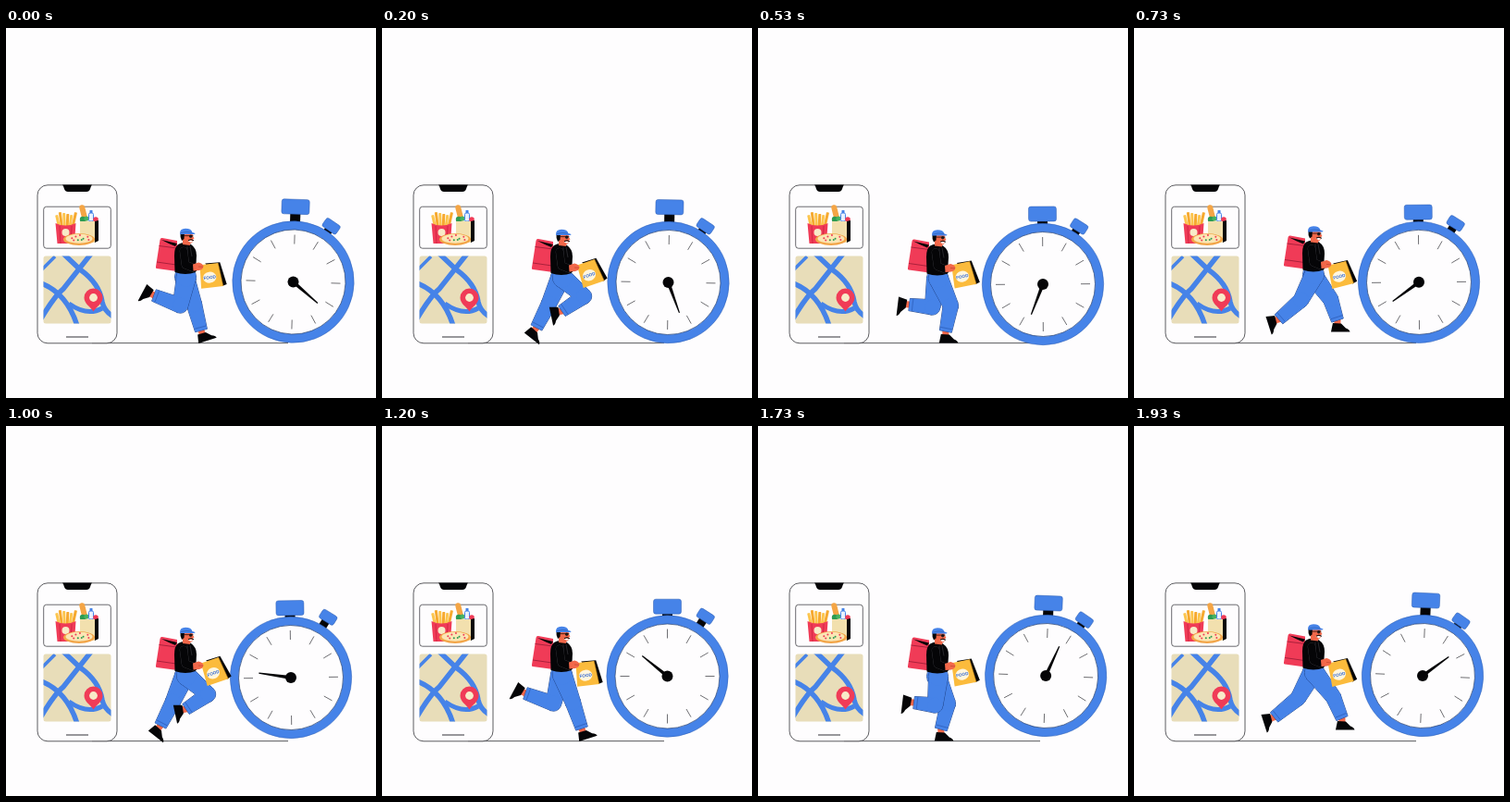
An HTML page with a canvas that plays this animation: 400x400 px, repeating every 2 s.

```html
<!DOCTYPE html>
<html lang="en">
<head>
<meta charset="utf-8">
<title>Food delivery</title>
<style>
html, body { margin: 0; width: 100%; height: 100%; overflow: hidden; background: #fefdfe; }
canvas { display: block; width: 400px; height: 400px; }
</style>
</head>
<body>
<canvas id="stage"></canvas>
<script>
const canvas = document.getElementById('stage');
const ctx = canvas.getContext('2d');
const dpr = window.devicePixelRatio || 1;
canvas.width = canvas.height = 400 * dpr;

const LOOP = 2000, FRAME = LOOP / 30, STEP = 400, STRIDE = 800;
const BLUE = '#4683e8', RED = '#f03b57', INK = '#050507', SKIN = '#f2684a',
      BEIGE = '#e8ddb9', CREAM = '#f8ebc8', YELLOW = '#fbbb3c', PAPER = '#fefdfe';
const rad = deg => deg * Math.PI / 180;

// time, x, y, tilt, hand angle, crown distance, side button distance
const WATCH = [
  [0, 310.5, 274.5, 1.8, 131, 81.3, 73],
  [200, 309.5, 275, 1, 160, 81.3, 72.8],
  [533, 308, 277, -0.4, 201, 76, 73.8],
  [1000, 308, 272, -0.8, 278, 75.3, 76.7],
  [1200, 308.5, 270.5, 0, 309, 75.3, 76.8],
  [1533, 310.3, 270, 1.8, 355, 75.5, 74.5],
  [1933, 312, 270, 2.5, 414, 81.5, 72.3]
];
// time, knee x, knee y, ankle x, ankle y, foot angle
const LEG = [
  [0, 205, 299, 213.5, 327, -18],
  [133, 207, 300, 200.5, 328, 0],
  [200, 182, 298, 169.5, 324, 38],
  [333, 179, 294, 154, 315, 72],
  [400, 187, 300, 157.5, 289, 118],
  [533, 190, 302, 166, 299, 97],
  [600, 217, 290, 192, 306, 78],
  [667, 220, 290, 211, 314, 15],
  [733, 214, 293, 222.5, 316, 0],
  [800, 205, 299, 213.5, 327, -18]
];
// time, body offset, bag x, bag y, bag angle
const BODY = [
  [0, 0, 221, 268, -7],
  [133, 1.5, 221.5, 267, -11],
  [200, 1, 224.5, 265.5, -19],
  [333, -2.5, 222.5, 267, -14],
  [400, 0, 221, 268, -7]
];

function at(keys, t) {
  let i = 1;
  while (i < keys.length - 1 && keys[i][0] < t) i++;
  const a = keys[i - 1], b = keys[i];
  const k = Math.min(1, (t - a[0]) / (b[0] - a[0]));
  return a.slice(1).map((v, n) => v + (b[n + 1] - v) * k);
}

function paint(fill, stroke, width = 0.8) {
  if (fill) { ctx.fillStyle = fill; ctx.fill(); }
  if (stroke) { ctx.strokeStyle = stroke; ctx.lineWidth = width; ctx.stroke(); }
}
function shape(d, fill, stroke, width = 0.8) {
  const p = new Path2D(d);
  if (fill) { ctx.fillStyle = fill; ctx.fill(p); }
  if (stroke) { ctx.strokeStyle = stroke; ctx.lineWidth = width; ctx.stroke(p); }
}
function box(x, y, w, h, r, fill, stroke, width) {
  ctx.beginPath();
  ctx.roundRect(x, y, w, h, r);
  paint(fill, stroke, width);
}
function oval(x, y, rx, ry, fill, stroke, width) {
  ctx.beginPath();
  ctx.ellipse(x, y, rx, ry, 0, 0, Math.PI * 2);
  paint(fill, stroke, width);
}
const disc = (x, y, r, fill, stroke, width) => oval(x, y, r, r, fill, stroke, width);
function placed(x, y, deg, draw) {
  ctx.save();
  ctx.translate(x, y);
  ctx.rotate(rad(deg));
  draw();
  ctx.restore();
}

function drawFood() {
  // fries
  for (let i = 0; i < 6; i++) {
    placed(57 + i * 3.1, 213, (i - 2.5) * 5, () =>
      box(-1.5, -11 - (i * 7 % 4), 3, 15, 0.6, i % 2 ? '#f6a92f' : '#fcc54d'));
  }
  shape('M53.5 211 Q64 216 75.5 211 L74 233 H55.5 Z', RED);
  shape('M58 214 L59 233 M71 214 L70 233', null, '#c9243f', 0.8);
  disc(64.5, 221, 4, CREAM);
  // groceries
  placed(84, 201, -14, () => box(-3, -10, 6, 18, 3, '#f4a545'));
  disc(83, 207, 3.2, '#2d9b52');
  disc(87, 206, 2.6, '#45b263');
  box(89.5, 200, 5, 9, 1.5, '#e9f1ff', BLUE, 1);
  box(90.5, 197, 3, 3, 0.5, BLUE);
  disc(97, 207, 2.8, RED);
  shape('M80 209 H96 V232 H80 Z', '#f2e0ae');
  shape('M96 209 L100 208 V230 L96 232 Z', INK);
  // pizza
  oval(79, 228.5, 17, 6.5, '#f2a548');
  oval(79, 227.8, 14.5, 5, '#fbe6b4');
  for (let i = 0; i < 9; i++) {
    const a = i * 2.4, r = 0.35 + (i % 3) * 0.25;
    disc(79 + Math.cos(a) * 13 * r, 227.8 + Math.sin(a) * 4.4 * r, 1, i % 3 ? RED : '#2d9b52');
  }
}

function drawMap() {
  ctx.save();
  box(40.5, 246.5, 73, 73, 2.5, BEIGE);
  ctx.clip();
  shape('M92 244 L62 282 Q53 289 38 314', null, BLUE, 5.5);
  shape('M62 244 L80 261 Q101 276 104 296 Q106 306 116 312', null, BLUE, 5.5);
  shape('M38 276 Q66 287 77 322', null, BLUE, 5.5);
  shape('M38 262 L53 247', null, BLUE, 3.5);
  shape('M68 298 Q88 312 104 303', null, BLUE, 5);
  ctx.restore();
  shape('M94.5 306.5 C91 301 84.5 298 84.5 291.5 A10 10 0 0 1 104.5 291.5 C104.5 298 98 301 94.5 306.5 Z', RED);
  disc(94.5, 291.5, 4.4, CREAM);
}

function drawPhone() {
  box(34, 169.8, 86, 171, 11, PAPER, '#333338', 0.8);
  shape('M61 169.5 H93 Q92 170 91 174 Q90 177 87 177 H67 Q64 177 63 174 Q62 170 61 169.5 Z', INK);
  box(40.7, 193.2, 72.6, 45, 3, PAPER, '#44444a', 0.8);
  drawFood();
  drawMap();
  shape('M65 334 H89', null, '#333338', 1);
}

function drawWatch(t) {
  const [x, y, tilt, hand, crown, side] = at(WATCH, t);
  placed(x, y, tilt, () => {
    box(-5.5, -crown, 11, crown - 60, 0, INK);
    box(-15, -crown - 8, 30, 16, 2.5, BLUE, '#2b5bb0', 0.5);
    placed(0, 0, 32.5, () => {
      box(-4.5, -side, 9, side - 60, 0, INK);
      box(-9, -side - 5.5, 18, 11, 2.5, BLUE, '#2b5bb0', 0.5);
    });
    disc(0, 0, 65.7, BLUE, '#2b5bb0', 0.5);
    disc(0, 0, 56.5, PAPER, '#26406f', 0.7);
    ctx.beginPath();
    for (let i = 0; i < 12; i++) {
      const c = Math.sin(i * Math.PI / 6), s = Math.cos(i * Math.PI / 6);
      ctx.moveTo(c * 41, s * 41);
      ctx.lineTo(c * 51, s * 51);
    }
    paint(null, '#333338', 0.7);
  });
  placed(x, y, hand, () => shape('M-2 0 L-0.6 -35 H0.6 L2 0 Z', INK));
  disc(x, y, 6, INK);
}

function limb(x1, y1, w1, x2, y2, w2) {
  const a = Math.atan2(y2 - y1, x2 - x1), nx = -Math.sin(a), ny = Math.cos(a);
  const p = new Path2D();
  p.moveTo(x1 + nx * w1, y1 + ny * w1);
  p.lineTo(x2 + nx * w2, y2 + ny * w2);
  p.lineTo(x2 - nx * w2, y2 - ny * w2);
  p.lineTo(x1 - nx * w1, y1 - ny * w1);
  p.closePath();
  return p;
}

function drawLeg(u, bob, near) {
  const [kx, ky, ax0, ay, foot] = at(LEG, u % STRIDE);
  const ax = ax0 + near * 2.5, kx2 = kx + near * 1.5;
  const hx = 194 + near, hy = 269 + bob;
  placed(ax, ay, foot, () => {
    box(-3.5, -3, 7, 9, 1, SKIN);
    shape('M-5 3 L-7 12.5 H13.5 Q13 10 9 8.5 L4 3.5 Z', INK);
  });
  const joint = (x, y, r) => {
    const p = new Path2D();
    p.arc(x, y, r, 0, Math.PI * 2);
    return p;
  };
  const parts = [
    limb(hx, hy, 10.5, kx2, ky, 8.2),
    limb(kx2, ky, 8.2, ax, ay, 6.6),
    joint(hx, hy, 10.5),
    joint(kx2, ky, 8.2)
  ];
  ctx.strokeStyle = '#1f3f80';
  ctx.lineWidth = 0.9;
  parts.forEach(p => ctx.stroke(p));
  ctx.fillStyle = BLUE;
  parts.forEach(p => ctx.fill(p));
  // cuff
  const a = Math.atan2(ay - ky, ax - kx2);
  placed(ax, ay, a * 180 / Math.PI, () => shape('M-3.5 -6.5 V6.5', null, '#2c5db8', 0.7));
}

function drawBackpack() {
  shape('M169 227 L185 230 L185 263 L163 260 Q161.5 260 162 258 L166.5 229 Q167 226.5 169 227 Z', RED);
  shape('M165.5 235.5 L185 238 M163 253 L184 256', null, '#8d1630', 0.7);
  shape('M168 229 L185 233 L183 236 L176 233 Z', INK);
}

function drawTorso() {
  shape('M186 234 Q193 230 200 234 Q206 238 206 246 L205 264 Q194 268 182.5 264 L182 246 Q182 237 186 234 Z', INK);
  shape('M199 236 L201 247 M196 236 L196 244', null, '#4a4a50', 0.5);
}

function drawHead() {
  shape('M191 226 L199 228 L199 235 L191 234 Z', SKIN);
  shape('M190 221 H201.5 L202 225 L203.5 227.5 L202 228.5 Q202 233 198 233.5 Q191.5 233 190.5 227 Z', SKIN);
  shape('M188.5 222 H193 L192.5 228 L190 230 Q188 226 188.5 222 Z', INK);
  shape('M196.5 230 Q199 229 202 230 L200 232 Z', '#ffffff');
  shape('M197 229.6 Q200 227.6 203 229.8', null, INK, 1);
  disc(199.7, 225.3, 1.7, '#2a2020');
  shape('M193 224.6 H202.5', null, INK, 0.7);
  shape('M188 223 Q187.5 216.8 194 216.8 Q200.5 216.8 201.3 220.7 L204.5 222 Q204.5 223 203 223 Z', BLUE);
  shape('M189 221.6 Q195 219.5 201 221', null, '#2b5bb0', 0.6);
}

function drawBag(x, y, deg) {
  placed(x, y, deg, () => {
    shape('M-4 -14 L12 -13.5 L16.5 11 L11 12.5 Z', INK);
    shape('M-10 -13 H10 L12.5 12.5 H-11.5 Z', YELLOW);
    shape('M10 -13 L12.5 12.5', null, '#8a5b0c', 0.5);
    oval(-1, 1.5, 7.2, 6, '#fff6df');
    ctx.fillStyle = '#2b63cf';
    ctx.font = '700 4.6px Arial, "Liberation Sans", sans-serif';
    ctx.textAlign = 'center';
    ctx.textBaseline = 'middle';
    ctx.fillText('FOOD', -1, 1.8);
  });
}

function drawArm() {
  ctx.lineCap = ctx.lineJoin = 'round';
  shape('M192 241 L194 256 L203 259.5', null, '#3c3c42', 8.6);
  shape('M192 241 L194 256 L203 259.5', null, INK, 8);
  ctx.lineCap = 'butt';
  ctx.lineJoin = 'miter';
  shape('M202 255.5 L208 253.5 Q212 254 213.5 257.5 Q213 261 209 262 L202.5 262.5 Z', SKIN);
  shape('M208 258 L213 258.3', null, '#a93a25', 0.5);
}

function drawRunner(t) {
  const [bob, bx, by, tilt] = at(BODY, t % STEP);
  const lifted = draw => { ctx.save(); ctx.translate(0, bob); draw(); ctx.restore(); };
  lifted(drawBackpack);
  drawLeg(t, bob, -1);
  drawLeg(t + STEP, bob, 1);
  lifted(() => { drawTorso(); drawHead(); });
  drawBag(bx, by, tilt);
  lifted(drawArm);
}

function render(t) {
  ctx.setTransform(dpr, 0, 0, dpr, 0, 0);
  ctx.fillStyle = PAPER;
  ctx.fillRect(0, 0, 400, 400);
  shape('M93 340.6 H305', null, '#333338', 0.8);
  drawPhone();
  drawWatch(t);
  drawRunner(t);
}

const start = performance.now();
function tick(now) {
  const t = Math.max(0, now - start) % LOOP;
  render(Math.min(29, Math.floor((t + 4) / FRAME)) * FRAME);
  requestAnimationFrame(tick);
}
render(0);
requestAnimationFrame(tick);
</script>
</body>
</html>
```
